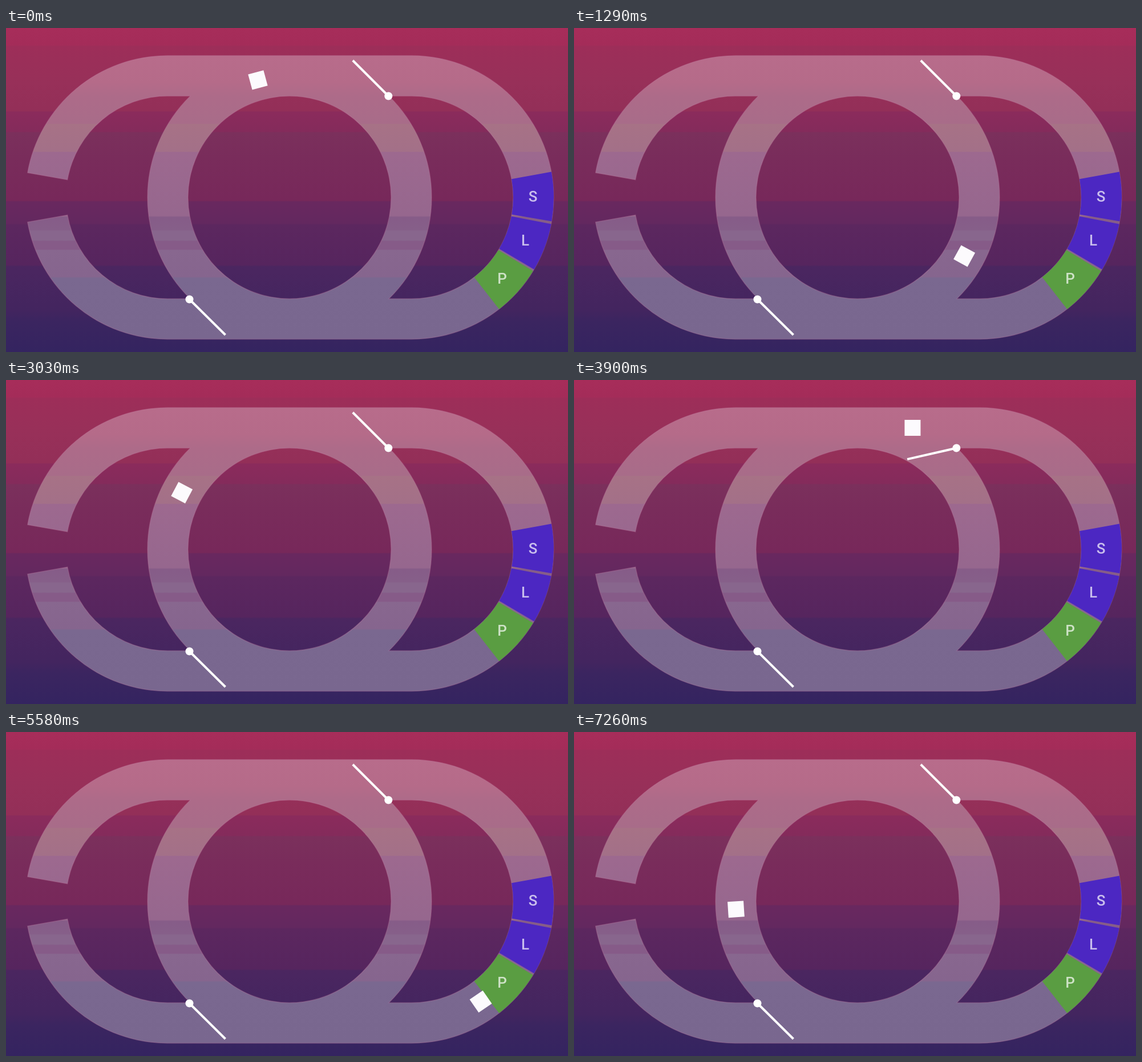
These frames come from a looping animation (985 px wide and 569 px high, 7290 ms). An HTML page:

```html
<!DOCTYPE html>
<html lang="en">
<head>
<meta charset="utf-8">
<title>Track loop</title>
<style>
  html, body { margin: 0; width: 100%; height: 100%; overflow: hidden; background: #34245f; }
  svg { display: block; width: 985px; height: 569px; }
  text { font: 500 26px Roboto, Arial, sans-serif; text-anchor: middle; fill: #fff; fill-opacity: .7; }
  .arm line { stroke: #fff; stroke-width: 4; }
  .arm circle { fill: #fff; }
</style>
</head>
<body>
<svg viewBox="0 0 985 569">
  <defs>
    <linearGradient id="sky" gradientUnits="userSpaceOnUse" x1="0" y1="0" x2="0" y2="569"></linearGradient>
    <linearGradient id="road" gradientUnits="userSpaceOnUse" x1="0" y1="0" x2="0" y2="569"></linearGradient>
  </defs>
  <rect width="985" height="569" fill="url(#sky)"/>
  <path id="track" fill="url(#road)" fill-rule="evenodd" stroke="#c07aa0" stroke-opacity=".3" stroke-width="1.5"/>
  <g id="zones"></g>
  <rect id="box" x="-14" y="-14" width="28" height="28" fill="#fcfafd"/>
  <g class="arm" transform="translate(321.5 476.5)">
    <line x2="63" y2="62.5"/><circle r="7"/>
  </g>
  <g class="arm" id="gate">
    <line x2="-62.5" y2="-62.5"/><circle r="7"/>
  </g>
</svg>
<script>
const LOOP = 7290;
const CY = 297.5, LEFT = 283, MID = 497, RIGHT = 711;
const OUT = 249, INN = 178, R = 213.5;
const LAP = 2 * Math.PI * R, RUN = RIGHT - MID, BEND = Math.PI * R;
const GATE_OPEN = -57.8;
const $ = id => document.getElementById(id);
const rad = deg => deg * Math.PI / 180;
const polar = (cx, r, deg) => [cx + r * Math.cos(rad(deg)), CY + r * Math.sin(rad(deg))];

function addStops(id, list) {
  $(id).innerHTML = list.map(([y, c]) => `<stop offset="${y / 569}" stop-color="${c}"/>`).join('');
}
addStops('sky', [
  [0, '#a72d5a'], [30, '#a42c59'], [32, '#9d2e59'], [90, '#983059'], [146, '#932f58'],
  [147, '#8b2b5c'], [182, '#842b5b'], [184, '#7b305c'], [230, '#792c5b'], [303, '#77285a'],
  [305, '#69285f'], [343, '#63285f'], [346, '#5c275f'], [416, '#56255e'],
  [419, '#4b2660'], [495, '#43255f'], [515, '#3b2560'], [569, '#342460']
]);
addStops('road', [
  [48, '#b86c8b'], [95, '#b56b89'], [120, '#ad6b89'], [168, '#a86c89'],
  [169, '#a77286'], [217, '#a37088'], [218, '#9d698f'], [330, '#96678e'],
  [332, '#865c88'], [355, '#865f89'], [356, '#88668d'], [373, '#88668d'],
  [374, '#865b88'], [389, '#865b88'], [390, '#88678f'], [437, '#86658e'],
  [439, '#7a6890'], [546, '#79678f']
]);

// Outer shell with its open left end, right window, centre window
function trackPath() {
  const top = CY - OUT, bottom = CY + OUT, inTop = CY - INN, inBottom = CY + INN;
  const dx = Math.sqrt(OUT * OUT - INN * INN);
  const arc = (r, sweep, x, y) => `A${r} ${r} 0 0 ${sweep} ${x} ${y}`;
  return [
    'M', polar(LEFT, OUT, 190), arc(OUT, 1, LEFT, top), 'H', RIGHT, arc(OUT, 1, RIGHT, bottom),
    'H', LEFT, arc(OUT, 1, ...polar(LEFT, OUT, 170)), 'L', polar(LEFT, INN, 170),
    arc(INN, 0, LEFT, inBottom), 'H', MID - dx, arc(OUT, 1, MID - dx, inTop),
    'H', LEFT, arc(INN, 0, ...polar(LEFT, INN, 190)), 'Z',
    'M', MID + dx, inTop, 'H', RIGHT, arc(INN, 1, RIGHT, inBottom),
    'H', MID + dx, arc(OUT, 0, MID + dx, inTop), 'Z',
    'M', MID, inTop, arc(INN, 1, MID, inBottom), arc(INN, 1, MID, inTop), 'Z'
  ].join(' ');
}
$('track').setAttribute('d', trackPath());

function zone([label, from, to, color, x, y]) {
  const d = `M${polar(RIGHT, OUT, from)} A${OUT} ${OUT} 0 0 1 ${polar(RIGHT, OUT, to)}` +
    `L${polar(RIGHT, INN, to)} A${INN} ${INN} 0 0 0 ${polar(RIGHT, INN, from)}Z`;
  return `<path d="${d}" fill="${color}"/><text x="${x}" y="${y}">${label}</text>`;
}
$('zones').innerHTML = [
  ['S', -10.4, 9.7, '#4c27c2', 923.5, 304.5],
  ['L', 10.8, 30.5, '#4c27c2', 910, 382],
  ['P', 31.3, 52, '#5a9d42', 869.5, 448.5]
].map(zone).join('');

// Time in ms, distance travelled from the top of the centre ring
const TRAVEL = [
  [0, -56.6], [750, 246.3], [1290, 442.3], [1500, 531], [2250, 815.3],
  [3900, 1437.5], [5010, 1865.1], [5250, 1965.8], [6000, 2264.2],
  [6180, 2335.2], [6750, 2563.9], [7260, 2761.4], [7290, 2773]
];
const GATE = [[0, 0], [3760, 0], [3890, GATE_OPEN], [4480, GATE_OPEN], [4620, 0], [LOOP, 0]];

function sample(table, t) {
  const i = Math.max(1, table.findIndex(([time]) => time >= t));
  const [t0, a] = table[i - 1], [t1, b] = table[i];
  return a + (b - a) * (t - t0) / (t1 - t0);
}

// One ring lap, then the right-hand loop, then the ring again from the bottom
function place(d) {
  const onArc = (cx, turn) => [...polar(cx, R, turn - 90), turn];
  const deg = s => s / R * 180 / Math.PI;
  if (d < LAP) return onArc(MID, deg(d));
  d -= LAP;
  if (d < RUN) return [MID + d, CY - R, 0];
  d -= RUN;
  if (d < BEND) return onArc(RIGHT, deg(d));
  d -= BEND;
  if (d < RUN) return [RIGHT - d, CY + R, 180];
  return onArc(MID, 180 + deg(d - RUN));
}

function draw(now) {
  const t = now % LOOP;
  const [x, y, turn] = place(sample(TRAVEL, t));
  $('box').setAttribute('transform', `translate(${x} ${y}) rotate(${turn})`);
  $('gate').setAttribute('transform', `translate(670.3 119.5) rotate(${sample(GATE, t)})`);
}

const start = performance.now();
function tick() {
  draw(performance.now() - start);
  requestAnimationFrame(tick);
}
tick();
</script>
</body>
</html>
```
